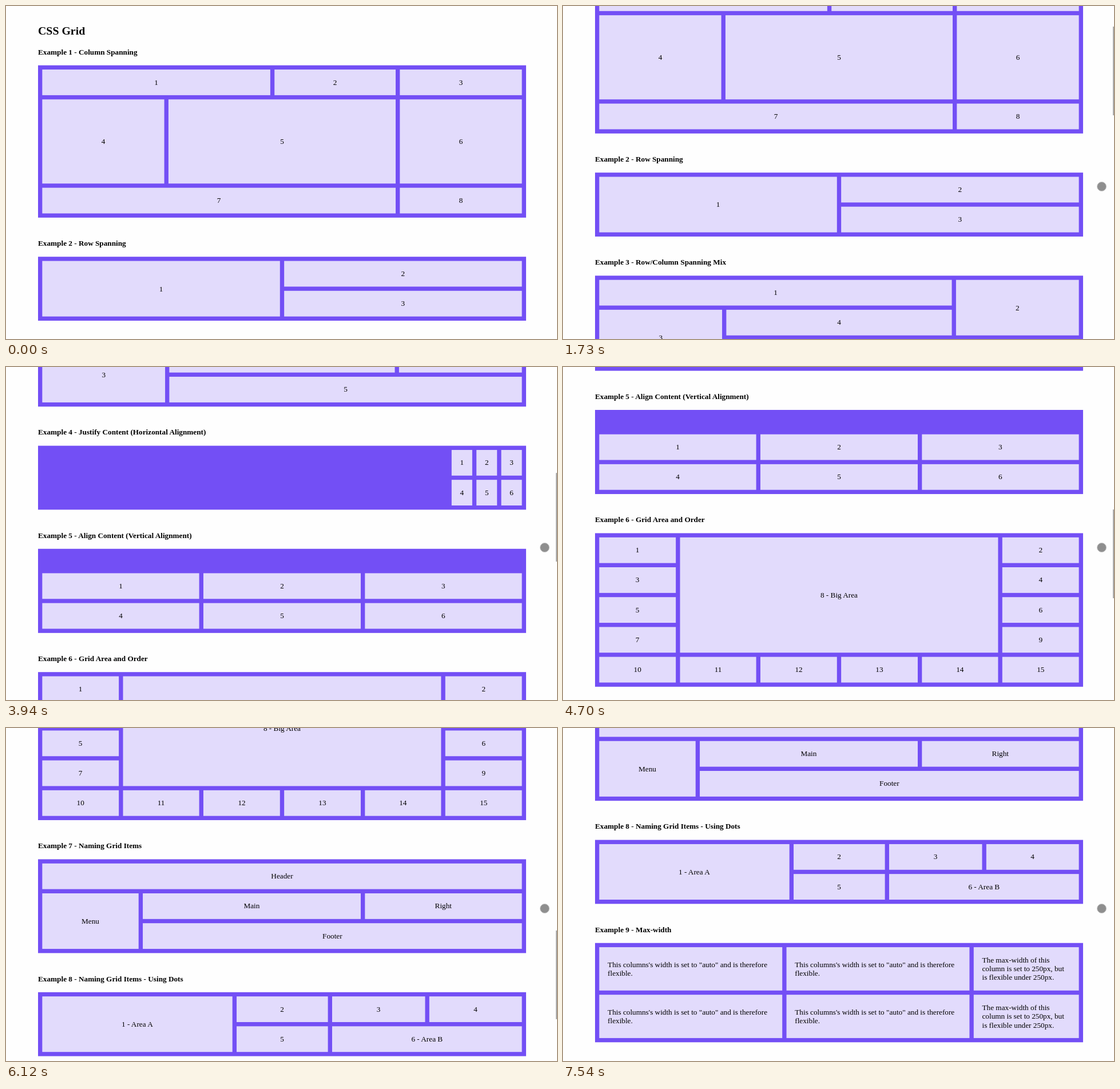
Recreate the animation shown at these times as an HTML page. Size 963 by 582 pixels, loop 8 s.

```html
<!DOCTYPE html>
<html lang="en">
<head>
<meta charset="utf-8">
<title>CSS Grid</title>
<style>
  html, body { margin: 0; width: 100%; height: 100%; overflow: hidden; background: #fefefe; }
  #stage { position: relative; width: 963px; height: 582px; overflow: hidden; }
  #page {
    position: absolute; left: 56px; top: 0; width: 1160px; transform-origin: 0 0;
    font: 18px/21px "Liberation Serif", "Times New Roman", serif; color: #000;
  }
  h2 { margin: 0; padding-top: 44.4px; font-size: 27px; line-height: 31px; }
  h4 { margin: 0 0 21px; font-size: 18px; line-height: 21px; }
  h2 + h4 { margin-top: 24px; }
  .grid {
    display: grid; gap: 10px; padding: 10px; margin-bottom: 51px;
    box-sizing: border-box; background: #734ff5;
  }
  .cell {
    display: flex; align-items: center; justify-content: center;
    padding: 20px; min-width: 0; white-space: pre; background: #e2dbfc;
  }
  .prose .cell { justify-content: flex-start; }
  #thumb { position: absolute; left: 961px; top: 0; width: 2px; height: 154.5px; background: #a9a9a9; }
  #pointer {
    position: absolute; left: -9px; top: -9px; width: 15px; height: 15px;
    border: 1.5px solid #c9c9c9; border-radius: 50%; background: #8e8e8e;
  }
</style>
</head>
<body>
<div id="stage">
  <div id="page"><h2>CSS Grid</h2></div>
  <div id="thumb"></div>
  <div id="pointer"></div>
</div>
<script>
const LOOP = 8000;
const SCALE = 0.7353;
const page = document.getElementById('page');
const thumb = document.getElementById('thumb');
const pointer = document.getElementById('pointer');

const wide = (text, cols) => ({ text, area: `auto / span ${cols}` });
const tall = (text, rows) => ({ text, area: `span ${rows} / auto` });
const count = (from, to) => Array.from({ length: to - from + 1 }, (_, i) => from + i);

const flexible = 'This columns\'s width is set to "auto" and is therefore\nflexible.';
const limited = 'The max-width of this\ncolumn is set to 250px, but\nis flexible under 250px.';

const examples = [
  { title: 'Column Spanning', columns: '290px 241.5px 288.5px 290px', style: 'grid-template-rows: 61px 200px 61px',
    cells: [wide(1, 2), 2, 3, 4, wide(5, 2), 6, wide(7, 3), 8] },
  { title: 'Row Spanning', columns: '1fr 1fr', cells: [tall(1, 2), 2, 3] },
  { title: 'Row/Column Spanning Mix', columns: '292px 536px 292px',
    cells: [wide(1, 2), tall(2, 2), tall(3, 2), 4, wide(5, 2)] },
  { title: 'Justify Content (Horizontal Alignment)', columns: 'repeat(3, 49px)', style: 'justify-content: end',
    cells: count(1, 6) },
  { title: 'Align Content (Vertical Alignment)', columns: 'repeat(3, 1fr)', style: 'height: 200px; align-content: end',
    cells: count(1, 6) },
  { title: 'Grid Area and Order', columns: 'repeat(6, 1fr)',
    cells: [...count(1, 7), { text: '8 - Big Area', area: '1 / 2 / 5 / 6' }, ...count(9, 15)] },
  { title: 'Naming Grid Items', columns: '229px 517.67px 373.33px',
    cells: [wide('Header', 3), tall('Menu', 2), 'Main', 'Right', wide('Footer', 2)] },
  { title: 'Naming Grid Items - Using Dots', columns: '451.5px 217.5px 220.5px 220.5px',
    cells: [tall('1 - Area A', 2), 2, 3, 4, 5, wide('6 - Area B', 2)] },
  { title: 'Max-width', columns: '435px 435px 250px', prose: true,
    cells: [flexible, flexible, limited, flexible, flexible, limited] },
];

function add(parent, tag, text = '') {
  const node = document.createElement(tag);
  node.textContent = text;
  return parent.appendChild(node);
}

examples.forEach((example, i) => {
  add(page, 'h4', `Example ${i + 1} - ${example.title}`);
  const grid = add(page, 'div');
  grid.className = example.prose ? 'grid prose' : 'grid';
  grid.style.cssText = `grid-auto-rows: auto; grid-template-columns: ${example.columns}; ${example.style || ''}`;
  for (const cell of example.cells) {
    const box = add(grid, 'div', cell.text ?? cell);
    box.className = 'cell';
    if (cell.area) box.style.gridArea = cell.area;
  }
});

// Wheel gestures: start, end, number of steps, scroll reached, share done by the first step
const gestures = [
  [1420, 1730, 4, 200, 0.2],
  [2190, 2300, 2, 300, 0.6],
  [2620, 2830, 3, 500, 0.3],
  [3050, 3480, 5, 800, 0.043],
  [3820, 4150, 4, 1100, 0.203],
  [4480, 4700, 3, 1300, 0.35],
  [5040, 5250, 3, 1500, 0.4],
  [5580, 5790, 3, 1700, 0.4],
  [6120, 6350, 3, 1900, 0.705],
  [6660, 6990, 4, 2203, 0.2],
];

// Progress 0..1 held in equal steps; the first step falls on start, the last on end
function stepped(t, start, end, steps) {
  const raw = (t - start) / (end - start) * (steps - 1);
  return Math.min(steps - 1, Math.floor(raw + 1e-6)) / (steps - 1);
}

function scrollAt(t) {
  let y = 0;
  for (const [start, end, steps, to, first] of gestures) {
    if (t < start) break;
    const eased = 1 - (1 - stepped(t, start, end, steps)) ** 1.5;
    y += (to - y) * (first + (1 - first) * eased);
  }
  return y * SCALE;
}

function draw(t) {
  const scroll = scrollAt(t);
  page.style.transform = `translateY(${-scroll}px) scale(${SCALE})`;

  thumb.style.transform = `translateY(${scroll * 0.2634 - 2.7}px)`;
  const fade = t < 7330 ? 0 : (1 + 2 * stepped(t, 7330, 7540, 3)) / 3;
  thumb.style.opacity = t < 1420 ? 0 : 1 - fade;

  const p = t < 100 ? 0 : stepped(t, 100, 970, 9);
  const glide = p * p * (3 - 2 * p);
  pointer.style.visibility = t < 100 ? 'hidden' : 'visible';
  pointer.style.transform = `translate(${678 + 264 * glide}px, ${554 - 238 * glide}px)`;
}

const began = performance.now();
function tick() {
  draw((performance.now() - began) % LOOP);
  requestAnimationFrame(tick);
}
tick();
</script>
</body>
</html>
```
